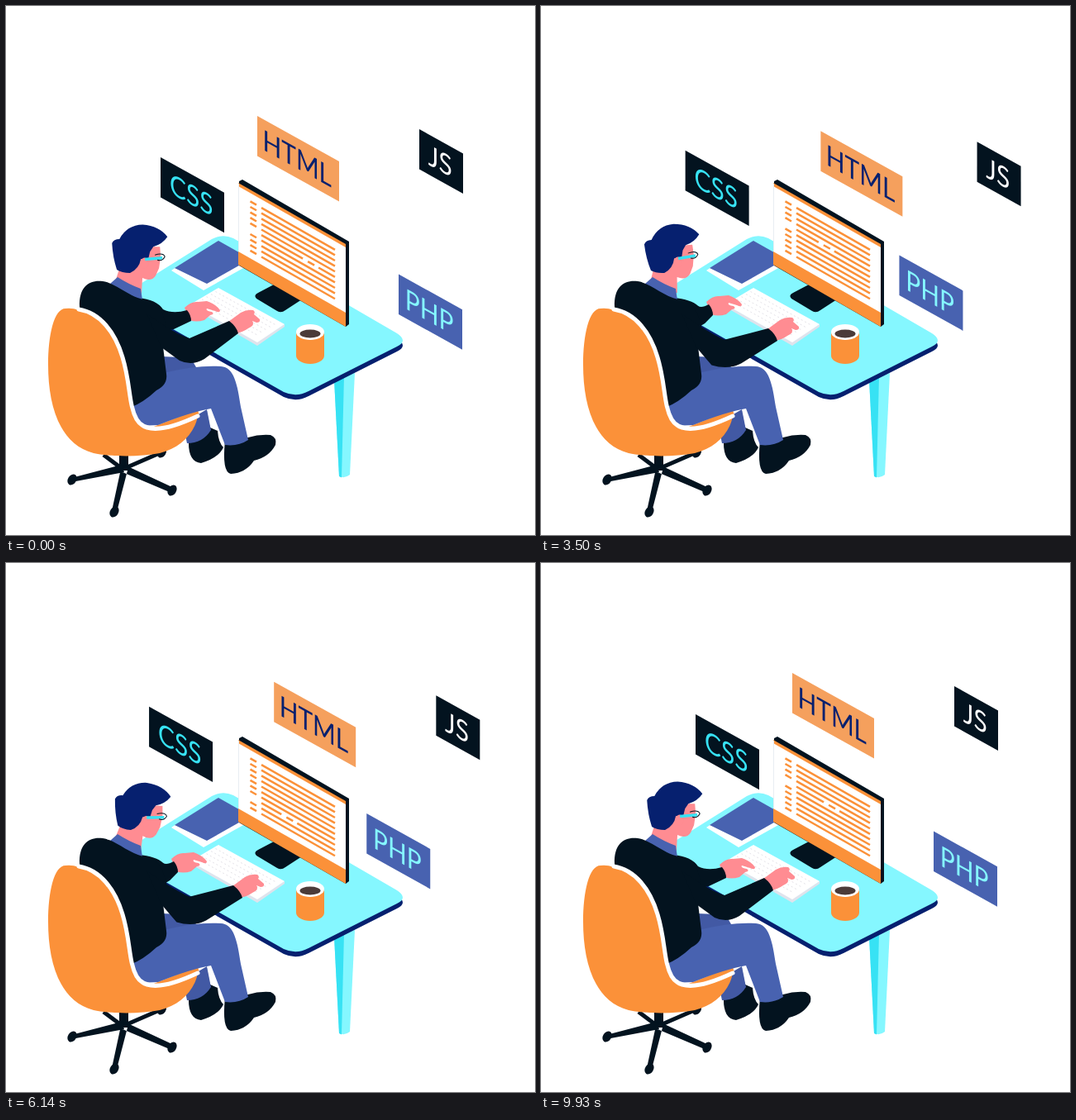
An HTML page for the animation above (10 s loop, 640x640 px).

```html
<!DOCTYPE html>
<html lang="en">
<head>
<meta charset="utf-8">
<title>Web developer at work</title>
<style>
html, body { margin: 0; width: 100%; height: 100%; overflow: hidden; background: #fff; }
svg { display: block; width: 100vw; height: 100vh; }
.ink { fill: #03131f; }
.orange { fill: #fb9139; }
.blue { fill: #4862b0; }
.shade { fill: #4259a4; }
.navy { fill: #06206f; }
.skin { fill: #ff8c92; }
.aqua { fill: #85f7ff; }
.cyan { fill: #37e2f4; }
.white { fill: #fff; }
.spoke { stroke: #03131f; stroke-width: 5; }
#code path { stroke: #fb9139; stroke-width: 2.5; }
#signs text { font: 400 34.5px Lato, sans-serif; text-anchor: middle; }
</style>
</head>
<body>
<svg viewBox="0 0 640 640">
  <defs>
    <clipPath id="screen"><path d="M284,226 L405,295 V362 L284,292Z"/></clipPath>
    <path id="top" d="M158,339 L249,282 Q262,275 275,281 L473,396 Q487,405 473,412 L366,466 Q351,474 336,467 L158,366Z"/>
  </defs>

  <g id="base">
    <path class="ink" d="M137,540 H148 V562 H137Z"/>
    <path class="spoke" d="M142,561 L118,543 M142,560 L188,540"/>
    <path class="ink" d="M140,555 L79,571 V576 L143,564Z M139,560 L128,611 L134,612 L147,562Z M143,555 L203,583 L200,589 L141,564Z"/>
    <g id="casters" class="ink"></g>
  </g>

  <g id="legs">
    <path class="shade" d="M188,424 Q214,424 226,430 L234,444 L190,450Z"/>
    <path class="ink" d="M221,525 L247,510 L256,514 Q257,528 263,534 Q257,547 236,553 Q220,552 221,525Z"/>
    <path class="shade" d="M214,505 L243,488 L248,513 Q238,529 219,529Z"/>
    <path class="ink" d="M265,526 L293,522 Q306,518 320,519 Q328,522 326,531 Q318,546 300,550 Q290,565 272,566 Q261,564 265,526Z"/>
    <path class="orange" d="M176,510 L232,488 L234,497 L190,515Z"/>
    <path class="blue" d="M146,470 L190,444 Q232,434 260,436 C276,437 280,458 284,485 L293,525 Q281,533 265,531 L248,487 Q224,491 184,507 L158,508Z"/>
  </g>

  <g id="desk">
    <path class="aqua" d="M397,452 L422,444 L416,567 Q410,572 403,569Z"/>
    <path class="cyan" d="M397,452 L409,448 L406,570.500 L403,569Z"/>
    <use href="#top" class="navy" y="6"/>
    <use href="#top" class="aqua"/>
    <path class="white" d="M200,320 L206,316 L243,334 L284,309 L298,311 L239,344Z"/>
    <path class="blue" d="M204,317 L257,284 L296,306 L243,336Z"/>
    <path class="ink" d="M303,354 Q299,350 305,347 L324,337 L358,355 L338,368 Q333,372 328,369Z"/>
    <path fill="#dfe3ec" d="M223,361 L304,406 L337,385 V388 L304,411 L223,364Z"/>
    <path class="white" d="M223,361 L257,341 L337,385 L304,407Z"/>
    <path id="keys" fill="none" stroke="#e4e2e8" stroke-dasharray="2 3"/>
    <path class="orange" d="M351,395 H385 V423 A17,10 0 0 1 351,423Z"/>
    <ellipse class="white" cx="368" cy="394.500" rx="17" ry="9.500"/>
    <ellipse cx="368" cy="396.500" rx="12.500" ry="5" fill="#4b3b39"/>
  </g>

  <g id="monitor">
    <path class="ink" d="M282,212 L286,210 L415,285 V385 L411,388 L282,314Z"/>
    <path class="orange" d="M281,214 L411,288 V388 L281,313Z"/>
    <path class="white" d="M281,218 L411,292 V371 L281,297Z"/>
    <path d="M281.500,215 V297" stroke="#e8edf2"/>
    <g clip-path="url(#screen)"><g id="code"></g></g>
  </g>

  <g id="man">
    <path id="handL" class="skin" d="M216,365 Q224,357 232,358 L243,357 Q254,361 259,368 Q259,372 253,369 L243,366 Q241,369 249,370 Q253,373 247,374 L240,380 Q230,383 222,380Z"/>
    <path id="sleeveL" class="ink"/>
    <g id="head">
      <path class="skin" d="M137,318 L132,334 Q148,348 164,348 L165,329 Q176,334 181,326 L185,317 L187,303 L186,291 L176,291 L160,302Z"/>
      <path class="navy" d="M128,287 Q130,282 137,282 Q146,265 165,264.500 Q185,266 195,279 Q189,288 178,291 L174,297 L172,306 L163,306 Q161,318 150,323 Q140,323 134,319 Q129,304 128,287Z"/>
      <ellipse class="skin" cx="167.500" cy="311" rx="5" ry="6.500"/>
      <path d="M168,306.500 L189,304.500" stroke="#37e2f4" stroke-width="3.500"/>
      <path d="M180,301 Q190,298 192,303 Q189,309 183,307" fill="none" stroke="#03131f"/>
    </g>
    <path class="blue" d="M126,336 L135,328 Q149,337 163,342 L165,356 Q147,354 126,336Z"/>
    <path class="ink" d="M89,364 C88,339 101,331 117,333 C132,335 148,351 166,355 L180,359 Q190,368 194,388 L190,412 L194,445 Q196,458 182,465 Q166,480 150,486 L90,370Z"/>
    <path id="handR" class="skin" d="M269,382 L284,371 Q291,367 299,368 Q302,370 300,373 L307,379 Q308,383 303,383 L298,381 Q302,386 293,390 Q286,395 278,396Z"/>
    <path id="sleeveR" class="ink"/>
  </g>

  <g id="chair">
    <path class="orange" d="M72,366 Q80,365 88,368 C114,372 132,396 140,425 C150,458 147,482 158,500 C169,519 198,512 232,496 C228,518 210,535 186,541 C160,546 124,545 106,541 C64,530 51,482 51,434 C51,398 58,366 72,366Z"/>
    <path d="M88,367 C114,371 132,395 141,425 C151,458 148,482 158,500 C169,519 198,512 232,496" fill="none" stroke="#fff" stroke-width="5" stroke-linecap="round"/>
  </g>

  <g id="signs"></g>
</svg>
<script>
const NS = 'http://www.w3.org/2000/svg';
const $ = id => document.getElementById(id);
const LOOP = 10, FPS = 14, LAST = LOOP - 1 / FPS;
const ROW = 6.6, ROWS_PER_SEC = 5;

function add(parent, tag, attrs, text) {
  const el = parent.appendChild(document.createElementNS(NS, tag));
  for (const key in attrs) el.setAttribute(key, attrs[key]);
  if (text) el.textContent = text;
  return el;
}
const move = (id, x, y) => $(id).setAttribute('transform', `translate(${x},${y})`);
const rand = n => { const v = Math.sin(n * 78.233) * 43758.5453; return v - Math.floor(v); };
const ease = x => { x = Math.min(1, Math.max(0, x)); return x * x * (3 - 2 * x); };

// Loop angle, passing half a turn at time mid.
const turn = (t, mid) => Math.PI * (t < mid ? t / mid : 1 + (t - mid) / (LAST - mid));
const swing = angle => (1 - Math.cos(angle)) / 2;
// Rises at the start and falls back to 0 at time end.
const plateau = (t, end) => ease(t / 1.2) * ease((end - t) / 1.2);

for (const [x, y] of [[80, 573], [131, 612], [201, 586], [188.5, 540]]) {
  add($('casters'), 'ellipse', { cx: x, cy: y, rx: 5, ry: 7, transform: `rotate(32 ${x} ${y})` });
}

let keys = '';
for (let i = 1; i < 6; i++) keys += `M${226 + i * 5.5},${361 - i * 3.1} l74,41`;
$('keys').setAttribute('d', keys);

// Rows of code; every eighth is broken into words and has no line mark.
function rowParts(i) {
  if (i % 8 !== 6) return [[295.5, 303], [309, 398]];
  const a = 325 + 35 * rand(i), b = a + 6, c = b + 8;
  return [[309, a], [b, c], [c + 5, 398]];
}
for (let i = 0; i < 64; i++) {
  const y = x => 237.5 + ROW * i + 0.57 * (x - 309);
  add($('code'), 'path', { d: rowParts(i).map(([a, b]) => `M${a},${y(a)} L${b},${y(b)}`).join('') });
}

const ISO = 0.866, TILT = 0.556 * ISO, SIGN_H = 48.5;
const signs = [
  { text: 'CSS', x: 187, y: 183, w: 77, dx: -24, dy: -16, turns: 2, mid: 4.7, bg: '#03131f', fg: '#37e2f4' },
  { text: 'HTML', x: 304, y: 133, w: 99, dx: 50, dy: 26.5, turns: 2, mid: 5.08, bg: '#f5a05d', fg: '#06206f' },
  { text: 'JS', x: 500, y: 149, w: 53, dx: 43.5, dy: 24, turns: 2, mid: 4.95, bg: '#03131f', fg: '#fff' },
  { text: 'PHP', x: 475, y: 324.5, w: 77, dx: -48, dy: -26.5, turns: 1, mid: 4.6, bg: '#4862b0', fg: '#85f7ff' }
];
for (const s of signs) {
  const w = s.w / ISO;
  s.el = add($('signs'), 'g');
  add(s.el, 'rect', { width: w, height: SIGN_H, fill: s.bg });
  add(s.el, 'text', { x: w / 2 - 1.5, y: 36.8, fill: s.fg }, s.text);
}

function draw(t) {
  for (const s of signs) {
    const p = swing(s.turns * turn(t, s.mid));
    s.el.setAttribute('transform', `matrix(${ISO},${TILT},0,1,${s.x + s.dx * p},${s.y + s.dy * p})`);
  }
  move('code', 0, -ROW * Math.floor(t * ROWS_PER_SEC + 0.01));

  const nod = 0.3 + 4.5 * Math.sin(2 * turn(t, 5.2));
  $('head').setAttribute('transform', `rotate(${nod} 150 335)`);

  const left = plateau(t, LAST), right = plateau(t, 8.9);
  const lx = -16 * left, ly = -7 * left, rx = 5 * right, ry = 9 * right;
  move('handL', lx, ly);
  move('handR', rx, ry);
  $('sleeveL').setAttribute('d',
    `M160,353 Q182,355 190,${367 + ly * .6} Q${202 + lx * .5},${373 + ly} ${219 + lx},${368 + ly}
     Q${224 + lx},${374 + ly} ${224 + lx},${381 + ly} L${203 + lx * .3},${391 + ly} L180,395Z`);
  $('sleeveR').setAttribute('d',
    `M170,372 L192,387 Q209,398 222,${402 + ry * .2} L${270 + rx},${381 + ry}
     Q${279 + rx},${388 + ry} ${281 + rx},${396 + ry} L${240 + rx * .4},${427 + ry * .6}
     Q${225 + rx * .2},${436 + ry * .5} ${210 - ry * .4},${429 + ry * .6} L188,413Z`);
}

function tick() {
  const s = performance.now() / 1000 % LOOP;
  draw(Math.floor(s * FPS + 0.05) / FPS % LOOP);
  requestAnimationFrame(tick);
}
draw(0);
requestAnimationFrame(tick);
</script>
</body>
</html>
```
